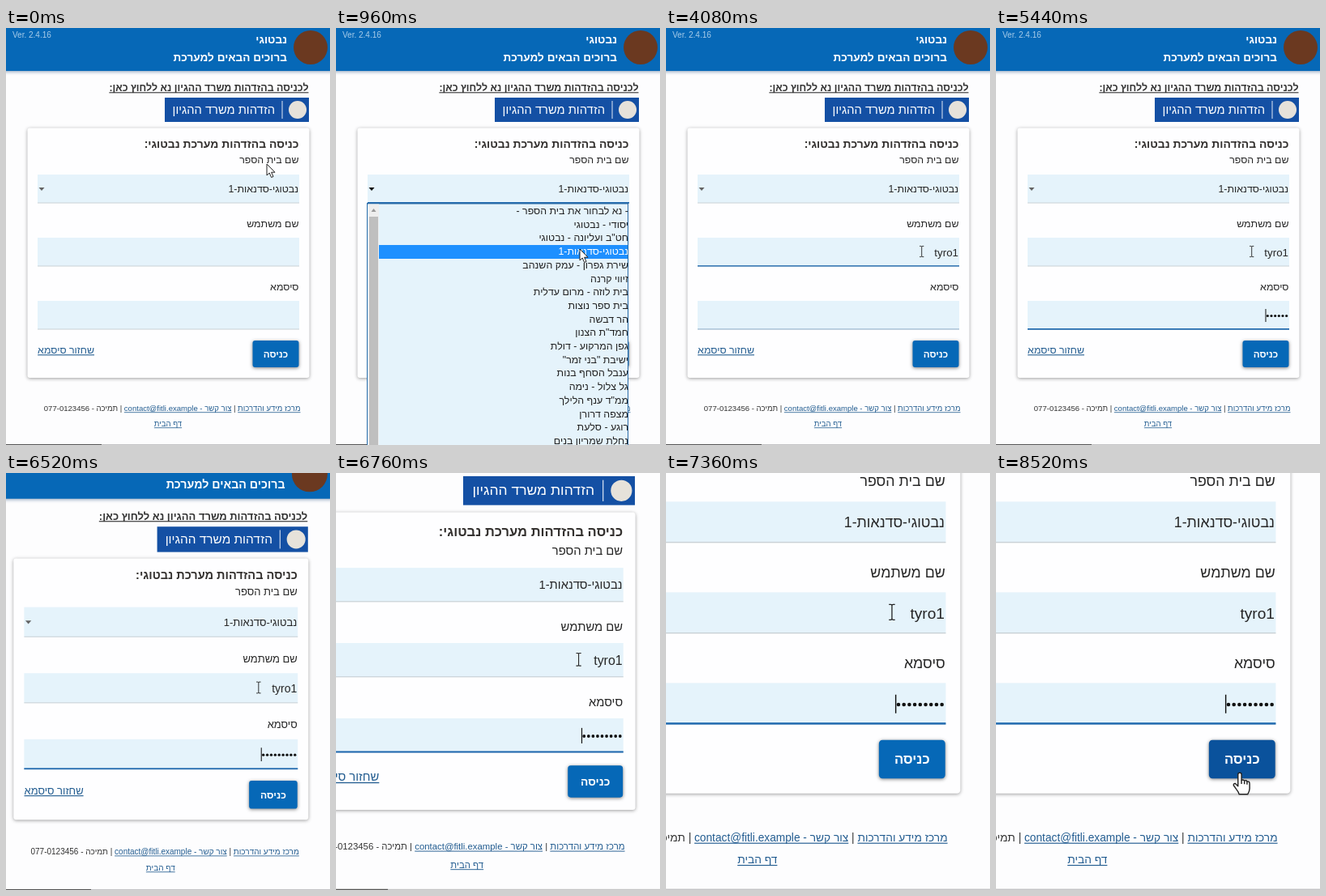
Recreate the animation shown at these times as an HTML page with a canvas. Size 400x515 px, loop 8560 ms.

```html
<!DOCTYPE html>
<html lang="he">
<head>
<meta charset="utf-8">
<style>
html, body { margin: 0; width: 100%; height: 100%; overflow: hidden; background: #fdfdfe; }
canvas { display: block; width: 400px; height: 515px; }
</style>
</head>
<body>
<canvas id="stage" width="400" height="515"></canvas>
<script>
const ctx = document.getElementById('stage').getContext('2d');
const LOOP = 8560, W = 400, H = 515;
const FONT = '"Liberation Sans", Arial, sans-serif';
const BLUE = '#0668b7', FIELD = '#e5f3fb', INK = '#262626', LINK = '#225c90';
const LEFT = 39, RIGHT = 362, BODY = 12.4, INPUT = 13.33, SMALL = 9.55;

const SCHOOL = 'נבטוגי-סדנאות-1';
const OPTIONS = [
  '- נא לבחור את בית הספר -', 'יסודי - נבטוגי', 'חט"ב ועליונה - נבטוגי', SCHOOL,
  'שירת גפרון - עמק השנהב', 'זיווי קרנה', 'בית לוזה - מרום עדלית', 'בית ספר נוצות',
  'הר דבשה', 'חמד"ת הצנון', 'גפן המרקוע - דולת', 'ישיבת "בני זמר"', 'ענבל הסחף בנות',
  'גל צלול - נימה', 'ממ"ד ענף הלילך', 'מצפה דרורן', 'רוגע - סלעת', 'נחלת שמריון בנים'
];
const ROW = 16.7, LIST_TOP = 218, SELECTED = 3;
const USER = 'tyro1';
const USER_KEYS = [2720, 2960, 3160, 3400, 3720];
const PASS_KEYS = [4520, 4840, 5000, 5120, 5280, 5440, 5600, 5880, 6240];
const DOT_STEP = 4.67;
const OPEN_AT = 480, CLOSE_AT = 1120;

// Pointer stops: time, x, y
const STOPS = [
  [0, 322, 168], [40, 322, 168], [400, 318, 200], [560, 318, 200], [880, 306, 245],
  [960, 301, 273], [1120, 301, 273], [1440, 315.7, 276]
];
const LAST_MOVE = { from: 7500, to: 8320, x: [315.7, 271, 302, 331], y: [276, 240, 386, 414.7] };

const ramp = (t, a, b) => Math.min(1, Math.max(0, (t - a) / (b - a)));
const smooth = u => u * u * (3 - 2 * u);
const smoother = u => u * u * u * (u * (6 * u - 15) + 10);
const typed = (keys, t) => keys.filter(k => k <= t).length;
const bezier = ([a, b, c, d], u) => {
  const v = 1 - u;
  return v * v * v * a + 3 * v * v * u * b + 3 * v * u * u * c + u * u * u * d;
};

function rect(x, y, w, h, color) {
  ctx.fillStyle = color;
  ctx.fillRect(x, y, w, h);
}

function circle(x, y, r, color) {
  ctx.fillStyle = color;
  ctx.beginPath();
  ctx.arc(x, y, r, 0, Math.PI * 2);
  ctx.fill();
}

function panel(x, y, w, h, color, blur, shade, drop = 1) {
  ctx.save();
  ctx.shadowColor = shade;
  ctx.shadowBlur = blur;
  ctx.shadowOffsetY = drop;
  ctx.fillStyle = color;
  ctx.beginPath();
  ctx.roundRect(x, y, w, h, 3);
  ctx.fill();
  ctx.restore();
}

// Right-to-left text centred vertically on y; returns its width.
function text(str, x, y, size = BODY, color = INK, { bold, line, align = 'right' } = {}) {
  ctx.font = `${bold ? 'bold ' : ''}${size}px ${FONT}`;
  ctx.direction = 'rtl';
  ctx.textAlign = align;
  ctx.textBaseline = 'alphabetic';
  ctx.fillStyle = color;
  const base = y + size * 0.31, width = ctx.measureText(str).width;
  ctx.fillText(str, x, base);
  if (line) {
    const left = align === 'center' ? x - width / 2 : x - width;
    ctx.fillRect(left, base + 1.4, width, size > 12 ? 1.1 : 0.8);
  }
  return width;
}

function drawHeader() {
  panel(-5, -5, W + 10, 58, BLUE, 4, 'rgba(40,80,130,.55)');
  ctx.font = `10px ${FONT}`;
  ctx.direction = 'ltr';
  ctx.textAlign = 'left';
  ctx.fillStyle = '#a9cdea';
  ctx.fillText('Ver. 2.4.16', 8, 11.5);
  text('נבטוגי', 347, 15, 13.6, '#fff', { bold: true });
  text('ברוכים הבאים למערכת', 347, 36.5, 13.6, '#fff', { bold: true });
  circle(376, 24, 21, '#6b3920');

  text('לכניסה בהזדהות משרד ההגיון נא ללחוץ כאן:', 373.5, 74, 12.4, '#333', { bold: true, line: true });
  rect(196, 86, 178, 30, '#1450a4');
  text('הזדהות משרד ההגיון', 332, 101, 14.7, '#fff');
  rect(340.5, 90, 1, 22, '#dfe8f4');
  circle(360, 101, 11, '#e6e2da');
}

function drawField(y, focus) {
  rect(LEFT, y, RIGHT - LEFT, 35, FIELD);
  rect(LEFT, y + 34.5, RIGHT - LEFT, 1, '#c9d1d6');
  if (focus > 0) {
    ctx.globalAlpha = focus;
    rect(LEFT, y + 34, RIGHT - LEFT, 1.7, '#1e68ae');
    ctx.globalAlpha = 1;
  }
}

function drawCaret(x, y) {
  rect(x - 0.5, y - 8, 1, 16, '#111');
}

function drawForm(t, hover) {
  panel(26.5, 123.5, 348, 308.5, '#fefeff', 4, 'rgba(0,0,0,.38)');
  text('כניסה בהזדהות מערכת נבטוגי:', 361.5, 143.6, 13.9, '#33302e', { bold: true });
  text('שם בית הספר', 361.5, 163.5);
  text('שם משתמש', 361.5, 242.3);
  text('סיסמא', 361.5, 320.3);

  const selectFocus = ramp(t, 420, 540) * (1 - ramp(t, 2120, 2280));
  const userFocus = ramp(t, 2120, 2280) * (1 - ramp(t, 4040, 4240));
  const passFocus = ramp(t, 4040, 4240);

  drawField(181, selectFocus);
  text(SCHOOL, 361, 199.3);
  const tone = Math.round(100 * (1 - selectFocus));
  ctx.fillStyle = `rgb(${tone},${tone},${tone})`;
  ctx.beginPath();
  ctx.moveTo(40.5, 197);
  ctx.lineTo(47.5, 197);
  ctx.lineTo(44, 201);
  ctx.fill();

  drawField(259, userFocus);
  const user = USER.slice(0, typed(USER_KEYS, t));
  const userWidth = text(user, 361, 277.5, INPUT);
  if ((t >= 2160 && t < 2520) || (t >= 2720 && t < 4080)) drawCaret(361 - userWidth, 278);

  drawField(337, passFocus);
  const dots = typed(PASS_KEYS, t);
  for (let i = 0; i < dots; i++) circle(361 - DOT_STEP * (i + 0.5), 355.5, 1.6, '#111');
  if (t >= 4120) drawCaret(361 - dots * DOT_STEP, 355);

  panel(304.5, 386, 57, 33, hover ? '#0a529c' : BLUE, 4, 'rgba(0,0,0,.5)');
  text('כניסה', 333, 403, 11.6, '#fff', { bold: true, align: 'center' });
  text('שחזור סיסמא', 109, 398, BODY, LINK, { line: true });
}

function drawFooter() {
  let x = 363.5;
  const part = (str, link) => {
    x -= text(str, x, 470, SMALL, link ? LINK : '#333', { line: link });
  };
  part('מרכז מידע והדרכות', true);
  part(' | ');
  part('צור קשר - contact@fitli.example', true);
  part(' | ');
  part('תמיכה - 077-0123456');
  text('דף הבית', 200, 489, SMALL, LINK, { line: true, align: 'center' });
  rect(0, 514, W, 1, '#c4c4c6');
  rect(0, 514, 118, 1, '#555');
}

function drawList(pointerY) {
  rect(38, 216, 323, 299, '#2b6ca8');
  rect(39, 217.5, 321, 298, FIELD);
  rect(40, 217.5, 13, 298, '#eeeeee');
  rect(41, 233, 11, 282, '#bfbfbf');
  ctx.fillStyle = '#999';
  ctx.beginPath();
  ctx.moveTo(43.5, 227);
  ctx.lineTo(49.5, 227);
  ctx.lineTo(46.5, 223);
  ctx.fill();
  const active = pointerY > LIST_TOP ? Math.floor((pointerY - LIST_TOP) / ROW) : SELECTED;
  OPTIONS.forEach((name, i) => {
    const top = Math.round(LIST_TOP + i * ROW);
    if (i === active) rect(53, top, 307, 17, '#1e90ff');
    text(name, 361, top + 7.7, BODY, i === active ? '#fff' : '#222');
  });
}

function pointerAt(t) {
  if (t >= LAST_MOVE.from) {
    const u = smooth(ramp(t, LAST_MOVE.from, LAST_MOVE.to));
    return [bezier(LAST_MOVE.x, u), bezier(LAST_MOVE.y, u)];
  }
  const next = STOPS.findIndex(s => s[0] > t);
  if (next < 0) return STOPS[STOPS.length - 1].slice(1);
  const [t0, x0, y0] = STOPS[next - 1], [t1, x1, y1] = STOPS[next];
  const u = smooth(ramp(t, t0, t1));
  return [x0 + (x1 - x0) * u, y0 + (y1 - y0) * u];
}

function outline(path) {
  const shape = new Path2D(path);
  ctx.fillStyle = '#fff';
  ctx.strokeStyle = '#222';
  ctx.lineWidth = 1;
  ctx.lineJoin = 'round';
  ctx.fill(shape);
  ctx.stroke(shape);
}

function drawPointer(x, y, kind) {
  ctx.save();
  ctx.translate(x, y);
  if (kind === 'beam') {
    ctx.strokeStyle = '#222';
    ctx.lineWidth = 0.9;
    ctx.stroke(new Path2D('M-2.6 -6.6H-1Q0 -6.6 0 -5.6Q0 -6.6 1 -6.6H2.6M0 -5.6V5.6M-2.6 6.6H-1Q0 6.6 0 5.6Q0 6.6 1 6.6H2.6'));
  } else if (kind === 'hand') {
    outline('M-1.5 1Q-1.5 -.5 0 -.5Q1.5 -.5 1.5 1V6Q2.5 5 4 6.3Q5.5 5.5 6.3 7Q8.5 6.5 8.5 9V13Q8.5 15 6.8 18H-.5Q-1 16 -3 13.5L-5.3 10.3Q-5.5 8.5 -3.8 8.7L-1.5 11Z');
    ctx.stroke(new Path2D('M1.5 6V9M4 6.5V9.3M6.3 7V9.6'));
  } else {
    outline('M0 0V14L3.2 11L5.6 16.5L8 15.5L5.6 10.2H10Z');
  }
  ctx.restore();
}

function draw(t) {
  const open = t >= OPEN_AT && t < CLOSE_AT;
  const [px, py] = pointerAt(t);
  const onButton = t > LAST_MOVE.from && px > 304 && px < 362 && py > 386 && py < 419;
  const inField = px > LEFT && px < RIGHT && ((py > 259 && py < 294) || (py > 337 && py < 372));
  const kind = onButton ? 'hand' : inField && !open ? 'beam' : 'arrow';

  ctx.setTransform(1, 0, 0, 1, 0, 0);
  rect(0, 0, W, H, '#fdfdfe');
  // The view zooms towards its bottom right corner.
  const zoom = 1 + 0.436 * smoother(ramp(t, 6240, 7355));
  ctx.setTransform(zoom, 0, 0, zoom, W * (1 - zoom), H * (1 - zoom));
  drawHeader();
  drawForm(t, onButton);
  drawFooter();
  if (open) drawList(py);
  drawPointer(px, py, kind);
}

const start = performance.now();
function frame() {
  draw((performance.now() - start) % LOOP);
  requestAnimationFrame(frame);
}
draw(0);
requestAnimationFrame(frame);
</script>
</body>
</html>
```
